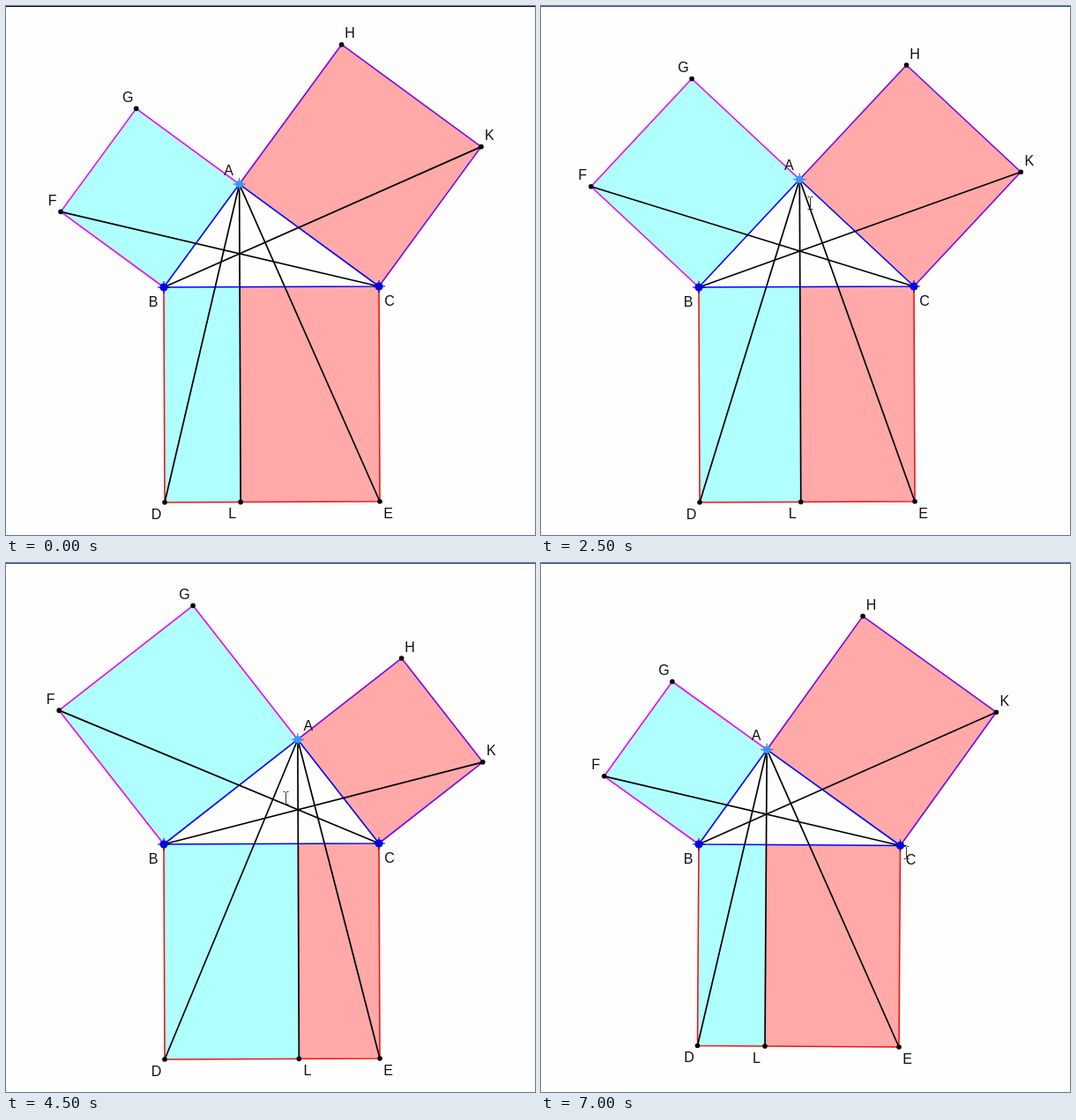
Recreate the animation shown at these times as an HTML page with a canvas. Size 600 px wide and 600 px high, loop 7.1 s.

```html
<!DOCTYPE html>
<html>
<head>
<meta charset="utf-8">
<style>
  html, body { margin: 0; width: 100%; height: 100%; overflow: hidden; background: #fefefe; }
  canvas { display: block; }
</style>
</head>
<body>
<canvas id="stage" width="600" height="600"></canvas>
<script>
const ctx = document.getElementById('stage').getContext('2d');
const LOOP = 7100, STEP = 100;
const CYAN = '#b0ffff', PINK = '#ffa9a9', BLUE = '#0000ff', RED = '#f01414',
      MAGENTA = '#f000f0', PURPLE = '#7800ee', BLACK = '#000', NAVY = '#30508c';

// A is dragged to and fro on its semicircle: turning points as [time, degrees from the top].
const turns = [[0, -17.1], [550, -34], [1150, 18], [1950, -32.3], [3103, 30],
  [3850, -25.6], [4700, 20.4], [5200, -19.3]];
const DROP_A = 5200, GRAB_C = 6400, END = 7000;

const add = (p, q, s = 1) => [p[0] + q[0] * s, p[1] + q[1] * s];
const sub = (p, q) => add(p, q, -1);
const perp = ([x, y]) => [y, -x];
const mix = (p, q, s) => add(p, sub(q, p), s);
const polar = (p, r, a) => add(p, [Math.sin(a), -Math.cos(a)], r);

// Smooth 0..1 progress between two times.
function ease(t, from, to) {
  const u = Math.min(1, Math.max(0, (t - from) / (to - from)));
  return (1 - Math.cos(Math.PI * u)) / 2;
}

function swing(t) {
  let angle = turns[0][1];
  for (let i = 1; i < turns.length; i++) {
    const [t0, a0] = turns[i - 1], [t1, a1] = turns[i];
    angle += (a1 - a0) * ease(t, t0, t1);
  }
  return angle * Math.PI / 180;
}

// The pointer leads A while dragging, drifting inwards, then arcs over to C.
function pointer(t, mid, C) {
  const drag = s => polar(mid, 145 - s * .02, swing(s + 70));
  if (t < DROP_A) return drag(t);
  const u = ease(t, DROP_A, GRAB_C);
  return add(mix([290, 277], add(C, [7, 8]), u), [0, 190 * Math.sin(Math.PI * u)]);
}

function path(points) {
  ctx.beginPath();
  points.forEach(p => ctx.lineTo(...p));
}
function fill(color, ...points) {
  path(points);
  ctx.fillStyle = color;
  ctx.fill();
}
function line(color, width, ...points) {
  path(points);
  ctx.strokeStyle = color;
  ctx.lineWidth = width;
  ctx.stroke();
}
function bar(color, height) {
  ctx.fillStyle = color;
  ctx.fillRect(-.5, -.5, 600, height);
}
function dot([x, y], r, color) {
  ctx.beginPath();
  ctx.arc(x, y, r, 0, 7);
  ctx.fillStyle = color;
  ctx.fill();
}
function handle(p, r, color, tick) {
  line(tick, 1, add(p, [-7, 0]), add(p, [7, 0]));
  line(tick, 1, add(p, [0, -7]), add(p, [0, 7]));
  dot(p, r, color);
}
function cursor(p) {
  const at = (x, y) => add(p.map(Math.round), [x, y]);
  line('#333', 1, at(0, -6), at(0, 6));
  for (const y of [-7, 7]) line('#333', 1, at(-3, y), at(-1, y), at(0, y * .85), at(1, y), at(3, y));
}

function draw(t) {
  const B = [178.5, 318.5], C = mix([422.5, 317.5], [407, 320], ease(t, GRAB_C, END));
  const base = sub(C, B), up = perp(base), mid = mix(B, C, .5);
  const angle = swing(t), split = (1 + Math.sin(angle)) / 2;
  const foot = mix(B, C, split), A = add(foot, up, Math.cos(angle) / 2);
  const D = sub(B, up), E = sub(C, up), L = sub(foot, up);
  const left = perp(sub(A, B)), right = perp(sub(C, A));
  const F = add(B, left), G = add(A, left), H = add(A, right), K = add(C, right);

  bar('#fefefe', 600);
  bar(t < 900 ? BLACK : NAVY, 1);

  fill(CYAN, A, B, F, G);
  fill(CYAN, B, foot, L, D);
  fill(PINK, A, C, K, H);
  fill(PINK, foot, C, E, L);

  line(RED, 1.6, B, D, E, C);
  line(MAGENTA, 1.6, B, F, G, A);
  line(PURPLE, 1.6, A, H, K, C);
  line(BLUE, 1.6, B, A, C, B);
  for (const [p, q] of [[A, D], [A, L], [A, E], [B, K], [C, F]]) line(BLACK, 1.7, p, q);

  // Labels sit on the outer side of their points.
  const corners = { A, B, C }, others = { D, E, F, G, H, K, L };
  function label(points, dx, dy) {
    ctx.fillStyle = '#111';
    for (const [name, [x, y]] of Object.entries(points)) {
      ctx.fillText(name, x + (x > mid[0] ? dx : -dx), y + (y > 300 ? dy : -dy) + 5.5);
    }
  }
  label(corners, 12, 16);
  label(others, 9.5, 13);

  for (const p of Object.values(others)) dot(p, 2.8, BLACK);
  for (const p of [B, C]) handle(p, 4.6, '#0000e6', '#000060');
  handle(A, 4.2, '#3399ff', '#2060a0');
  if (t > 0) cursor(pointer(t, mid, C));
}

ctx.font = '16px "Liberation Sans", Arial, sans-serif';
ctx.textAlign = 'center';
ctx.lineJoin = 'round';
ctx.translate(.5, .5);

const start = performance.now();
function tick() {
  const t = (performance.now() - start) % LOOP;
  draw(Math.floor(t / STEP) * STEP);
  requestAnimationFrame(tick);
}
tick();
</script>
</body>
</html>
```
